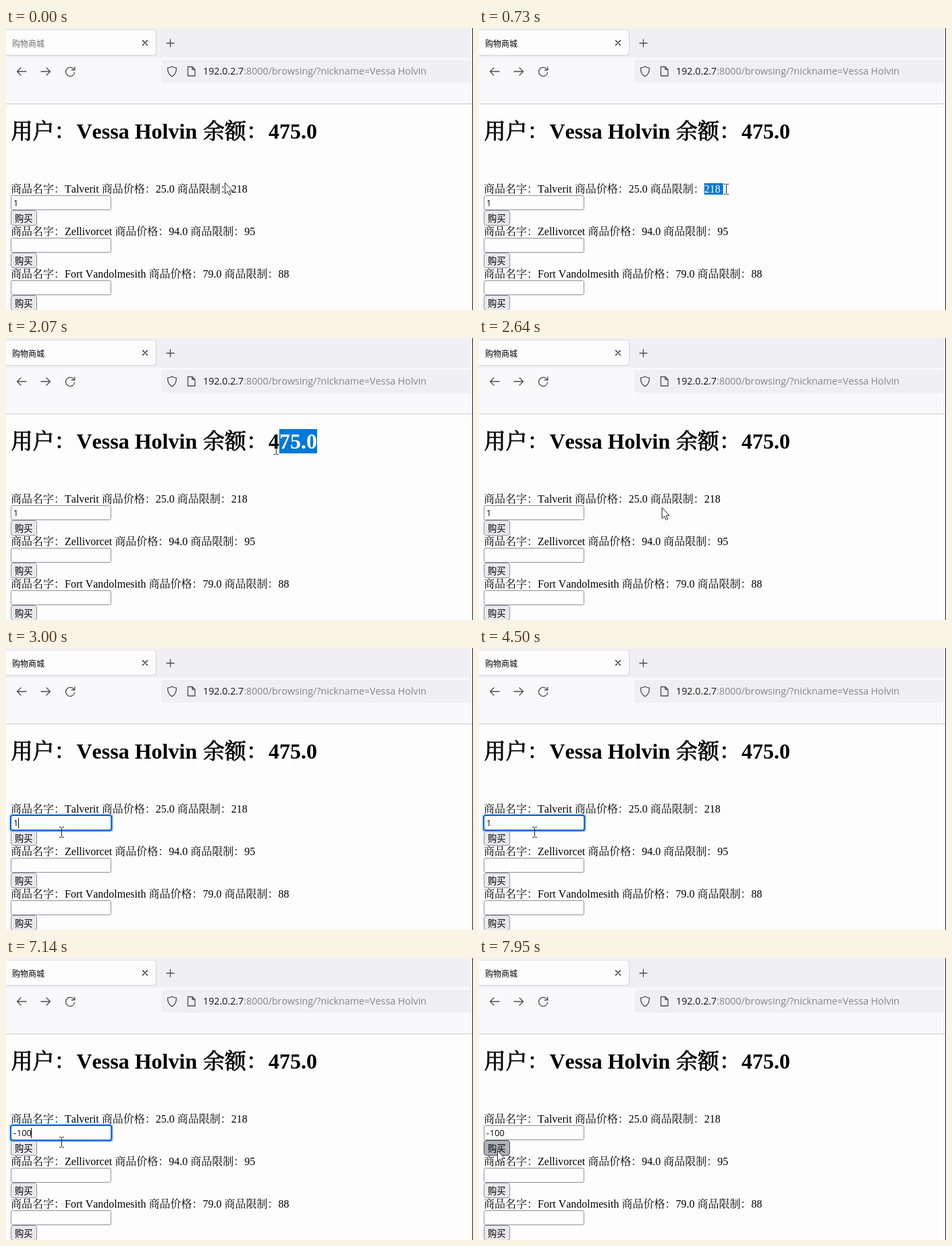
An HTML page for the animation above (7990 ms loop, 692x418 px).

```html
<!DOCTYPE html>
<html lang="zh-CN">
<head>
<meta charset="utf-8">
<title>购物商城</title>
<style>
html, body { margin: 0; width: 100%; height: 100%; overflow: hidden; background: #fdfdfd; }
svg { display: block; width: 692px; height: 418px; }
text { white-space: pre; font-kerning: none; text-spacing-trim: space-all; }
.serif { font-family: "Liberation Serif", "Noto Serif CJK SC", "Noto Sans CJK SC", "Noto Sans CJK", serif; font-size: 16px; }
.head { font-size: 32px; font-weight: 700; }
.cjk { font-size: 32px; font-weight: 400; stroke: #000; stroke-width: .8px; }
.ui { font-family: "Noto Sans CJK SC", "Noto Sans CJK", sans-serif; }
.num { font-family: "Open Sans", "Noto Sans", sans-serif; font-size: 12.6px; }
.url { font-family: "Open Sans", "Noto Sans", sans-serif; font-size: 14.25px; }
.icon { fill: none; stroke: #4a4a50; stroke-width: 1.3; stroke-linecap: round; stroke-linejoin: round; }
</style>
</head>
<body>
<svg id="stage" viewBox="0 0 692 418"></svg>
<script>
const LOOP = 7990;
const SELECT = '#0078d7', FACE = '#e9e9ed', EDGE = '#8f8f9d', BAR = '#f0f0f4';
const stage = document.getElementById('stage');

function set(node, attrs) {
  for (const k in attrs) node.setAttribute(k, attrs[k]);
  return node;
}
function add(tag, attrs, text, parent = stage) {
  const node = set(document.createElementNS('http://www.w3.org/2000/svg', tag), attrs);
  if (text) node.textContent = text;
  return parent.appendChild(node);
}
const rect = (x, y, width, height, fill, more) => add('rect', { x, y, width, height, fill, ...more });
const label = (x, y, cls, text, more) => add('text', { x, y, class: cls, ...more }, text);
const icon = (d, more) => add('path', { d, class: 'icon', ...more });
const show = (node, on) => node.setAttribute('visibility', on ? 'visible' : 'hidden');

// Browser frame
rect(0, 0, 692, 418, '#fdfdfd');
rect(0, 0, 692, 44, BAR);
rect(0, 44, 692, 68, '#f9f9fb');
rect(0, 112, 692, 1, '#ccccd0');
rect(-4, 3, 227, 38, '#d2d2d8', { rx: 4 });
rect(-4, 3.5, 226, 36.5, '#fdfdfd', { rx: 4 });
const tabTitle = label(9, 27.5, 'ui', '购物商城', { 'font-size': 12 });
icon('M202.5 18.5l7 7m0-7l-7 7', { style: 'stroke:#222' });
icon('M238 22.5h11m-5.5-5.5v11');
icon('M30 64.5H16.5m5.5-5.5l-5.5 5.5 5.5 5.5');
icon('M52 64.5h13.5m-5.5-5.5l5.5 5.5-5.5 5.5');
icon('M101 62a6.6 6.6 0 1 0 .6 4M101.8 57.8v4.6h-4.6');
rect(230, 47, 470, 34, BAR, { rx: 4 });
icon('M246 57c2 1.4 4.2 2 6.5 2.2 0 6-1.5 10-6.5 12.6-5-2.6-6.5-6.6-6.5-12.6 2.3-.2 4.5-.8 6.5-2.2z');
icon('M269.5 57.5h6.5l4 4v9.5h-10.5zM276 57.5v4h4');
const url = label(292, 69, 'url', '', { fill: '#84848a' });
add('tspan', { fill: '#18181c' }, '192.0.2.7', url);
add('tspan', {}, ':8000/browsing/?nickname=Vessa Holvin', url);

// Page
label(7.5, 164, 'serif cjk', '用户：');
label(104.5, 164, 'serif head', 'Vessa Holvin');
label(292, 164, 'serif cjk', '余额：');
label(389, 164, 'serif head', '475.0');

const goods = [['Talverit', '25.0', '218'], ['Zellivorcet', '94.0', '95'], ['Fort Vandolmesith', '79.0', '88']];
const buttons = goods.map(([name, price, limit], i) => {
  const y = i * 63;
  label(7, y + 244, 'serif', `商品名字：${name} 商品价格：${price} 商品限制：${limit}`);
  rect(7.5, y + 248.5, 148, 21, '#fdfdfd', { rx: 2, stroke: EDGE });
  const button = rect(7.5, y + 270.5, 38, 22, FACE, { rx: 3.5, stroke: EDGE });
  label(13, y + 286.5, 'ui', '购买', { 'font-size': 13.3 });
  return button;
});

// Field being edited
const focus = add('g', {});
const ring = (x, y, width, height, stroke, w) =>
  add('rect', { x, y, width, height, rx: 3, fill: 'none', stroke, 'stroke-width': w }, '', focus);
ring(5.3, 246.3, 152.9, 26, '#b8d4f4', 1.6);
ring(7, 248, 149.5, 22.5, '#0060df', 2);
const sign = label(11, 264, 'num', '-');
const digits = label(11, 264, 'num', '1');
const caret = rect(18, 252, 1, 15, '#000');

// Selections
const limitBox = rect(333.7, 230, 28, 17, SELECT);
const limitText = label(333.7, 244, 'serif', '', { fill: '#fff' });
const sumBox = rect(389, 135, 72, 36, SELECT);
const sumText = label(389, 164, 'serif head', '', { fill: '#fff' });

// Pointer shapes
const arrow = add('path', {
  d: 'M0 0V16L3.7 12.6 6.2 18.2 8.6 17.1 6.2 11.7H11Z',
  fill: '#fff', stroke: '#222', 'stroke-width': 1
});
const beam = add('path', {
  d: 'M-3.5 -7.5H-1L0 -6.5 1 -7.5H3.5M0 -6.5V6.5M-3.5 7.5H-1L0 6.5 1 7.5H3.5',
  fill: 'none', stroke: '#222', 'stroke-width': 1
});
rect(691, 0, 1, 418, '#222');

// time, x, y
const route = [
  [0, 324, 229], [240, 333, 237], [400, 334, 239], [640, 373, 240], [810, 361, 238], [850, 361, 240],
  [1050, 361, 240], [1420, 500, 162], [1500, 500, 158], [1600, 466, 155], [1820, 446, 158],
  [2070, 400.5, 165], [2190, 391, 165], [2350, 391, 165], [2480, 488, 190],
  [2760, 110, 296], [2900, 88, 265], [3000, 82.5, 273], [7580, 82.5, 273], [7740, 46, 291], [7870, 27, 285]
];
// start time, arrow or not
const shapes = [[0, 1], [200, 0], [1140, 1], [1510, 0], [2400, 1], [2840, 0], [7640, 1]];
// time, field value, caret x (0 = not drawn)
const edits = [
  [0, '1', 0], [2920, '1', 18], [3450, '1', 0], [3950, '1', 18], [4500, '1', 0], [4540, '1', 11],
  [4620, '-1', 16], [5070, '-1', 0], [5550, '-1', 16], [5920, '-1', 23], [6080, '-1', 0], [6120, '-1', 23],
  [6410, '-10', 30], [6530, '-100', 37], [6610, '-100', 0], [7140, '-100', 37], [7600, '-100', 0]
];

const lastAt = (list, t) => list.filter(k => k[0] <= t).pop();

function pointerAt(t) {
  const i = route.findIndex(k => k[0] > t);
  if (i < 0) return route[route.length - 1].slice(1);
  const [a, b] = [route[i - 1], route[i]];
  const p = (t - a[0]) / (b[0] - a[0]);
  return [a[1] + (b[1] - a[1]) * p, a[2] + (b[2] - a[2]) * p];
}

// Highlights whole characters between two edges
function highlight(box, node, chars, x, widths, from, to) {
  let text = '', start = 0, size = 0;
  [...chars].forEach((c, i) => {
    const mid = x + widths[i] / 2;
    if (mid >= from && mid <= to) {
      if (!text) start = x;
      text += c;
      size += widths[i];
    }
    x += widths[i];
  });
  set(box, { x: start, width: size });
  set(node, { x: start }).textContent = text;
}

function draw(t) {
  const [x, y] = pointerAt(t);
  const isArrow = lastAt(shapes, t)[1];
  show(arrow, isArrow);
  show(beam, !isArrow);
  arrow.setAttribute('transform', `translate(${x + .5} ${y + .5})`);
  beam.setAttribute('transform', `translate(${x} ${y})`);

  const grey = Math.round(110 * (1 - Math.min(1, Math.max(0, (t - 40) / 560))));
  tabTitle.setAttribute('fill', `rgb(${grey},${grey},${grey})`);

  const limitOn = t >= 400 && t < 1580;
  const limitEnd = limitOn ? (t > 850 ? 400 : x) : 0;
  highlight(limitBox, limitText, '218 ', 333.7, [8, 8, 8, 4], 330, limitEnd);

  const sumOn = t >= 1600 && t < 2480;
  highlight(sumBox, sumText, '475.0', 389, [16, 16, 16, 8, 16], sumOn ? x : 999, 500);

  const [, value, caretX] = lastAt(edits, t);
  const negative = value[0] === '-';
  show(sign, negative);
  set(digits, { x: negative ? 16 : 11 }).textContent = value.replace('-', '');
  show(caret, caretX);
  caret.setAttribute('x', caretX);
  show(focus, t >= 2920 && t < 7870);

  const pressed = t >= 7870, hover = t >= 7760;
  set(buttons[0], {
    fill: pressed ? '#b1b1b9' : hover ? '#d0d0d7' : FACE,
    stroke: pressed ? '#484851' : hover ? '#676774' : EDGE
  });
}

const begin = performance.now();
function tick() {
  draw((performance.now() - begin) % LOOP);
  requestAnimationFrame(tick);
}
draw(0);
requestAnimationFrame(tick);
</script>
</body>
</html>
```
